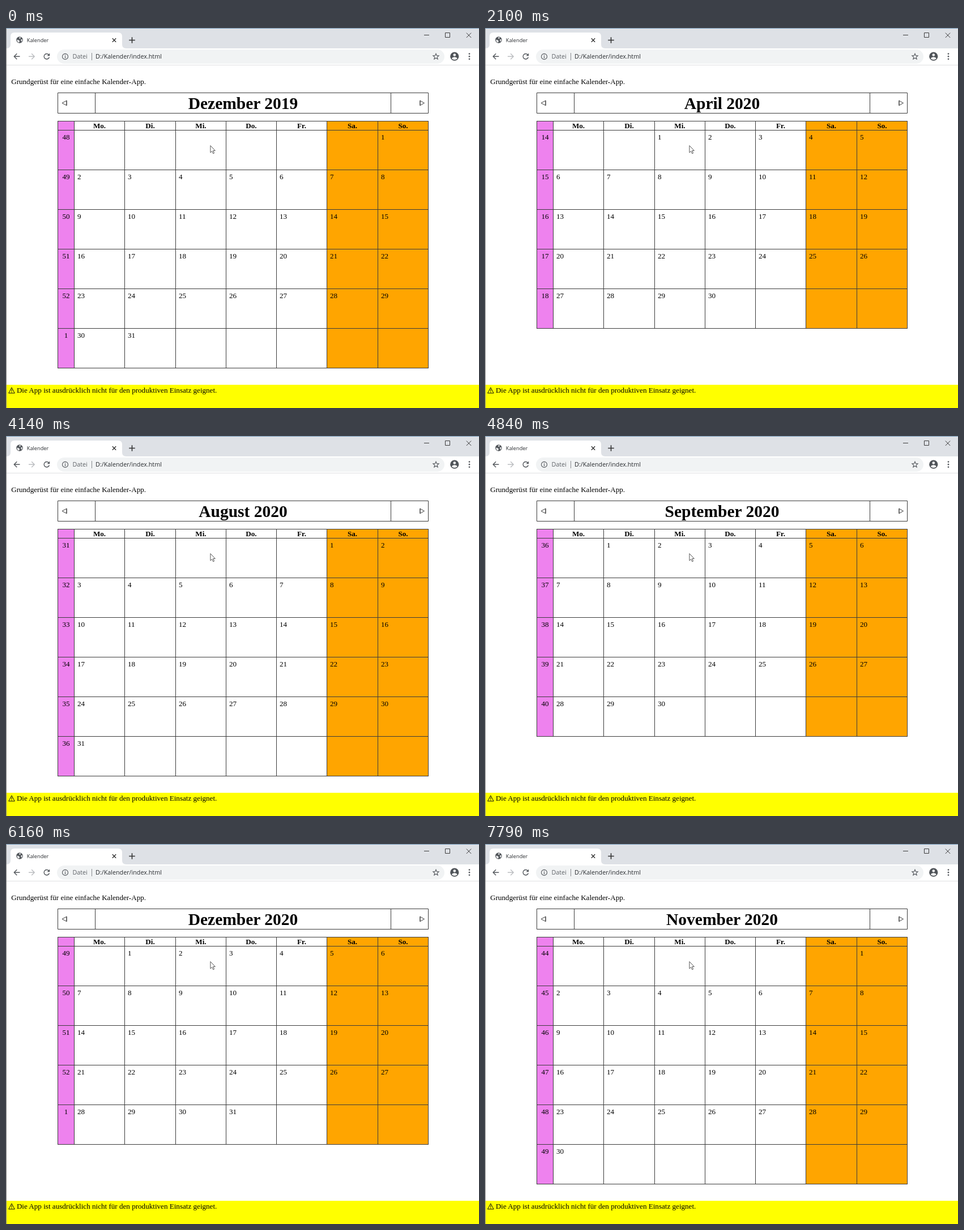
An HTML page that plays this animation: 835x671 px, repeating every 8000 ms.

```html
<!DOCTYPE html>
<html lang="de">
<head>
<meta charset="utf-8">
<title>Kalender</title>
<style>
  html, body { margin: 0; width: 100%; height: 100%; overflow: hidden; background: #fff; }
  svg { display: block; width: 100vw; height: 100vh; }
  text { font: 13.1px "Liberation Serif", serif; fill: #000; }
  .bold { font-weight: bold; text-anchor: middle; }
  .title { font-size: 29.5px; }
  .mid { text-anchor: middle; }
  .ui { font-family: "Open Sans", "Noto Sans", sans-serif; font-size: 10.75px; fill: #2a2d31; }
  .line { fill: none; stroke: #3c3c3c; stroke-width: 1; }
  .icon { fill: none; stroke: #55595e; stroke-width: 1.4; }
</style>
</head>
<body>
<svg viewBox="0 0 835 671" xmlns="http://www.w3.org/2000/svg">
  <rect width="835" height="671" fill="#fff"/>

  <!-- tab strip -->
  <rect width="835" height="36" fill="#dee1e6"/>
  <path d="M1 36Q8 36 8 29V15Q8 8 15 8H198Q205 8 205 15V29Q205 36 212 36Z" fill="#fff"/>
  <circle cx="24" cy="21" r="5.8" fill="#505459"/>
  <path d="M19.5 20.5L23 21.5 24.2 23.5 22.8 25.8Q19.3 24.8 19.5 20.5ZM23.2 16.5L26 16.3 25.5 18.5 23.8 19.5ZM26 20.5L28.7 19.5V22.5L27 24.3Z" fill="#e9eaec"/>
  <text class="ui" x="36.8" y="24.6" style="font-size:9.2px">Kalender</text>
  <path class="icon" d="M187.8 18.3L194.2 24.7M194.2 18.3L187.8 24.7" style="stroke:#333"/>
  <path class="icon" d="M217.2 21.5H227.8M222.5 16.2V26.8" style="stroke:#333;stroke-width:1.6"/>
  <path class="line" d="M738 12.5H747M775.5 8.5H783.5V16.5H775.5ZM812.8 8.6L821.2 17M821.2 8.6L812.8 17"/>

  <!-- toolbar -->
  <path class="icon" d="M24.5 50.2H14.5M19.3 45.2L14.3 50.2 19.3 55.2"/>
  <path class="icon" d="M40 50.2H50M45.2 45.2L50.2 50.2 45.2 55.2" style="stroke:#bcbec1"/>
  <path class="icon" d="M75.3 47A4.7 4.7 0 1 0 76.4 51.5"/>
  <path d="M77.2 44.6V49.3H72.5Z" fill="#55595e"/>
  <rect x="90" y="38" width="684" height="25" rx="12.5" fill="#f1f3f4"/>
  <circle class="icon" cx="104.5" cy="50.4" r="5" style="stroke-width:1.1"/>
  <path class="icon" d="M104.5 49.6V53.2M104.5 47.3V48.5" style="stroke-width:1.2"/>
  <text class="ui" x="117.4" y="54.4" style="fill:#5f6368">Datei</text>
  <path class="line" d="M151.5 44V57" style="stroke:#888b8f"/>
  <text class="ui" x="158" y="54.4">D:/Kalender/index.html</text>
  <path class="icon" id="star" style="stroke-width:1.1"/>
  <circle cx="791.8" cy="50.2" r="7.6" fill="#505459"/>
  <circle cx="791.8" cy="47.5" r="2.3" fill="#fff"/>
  <path d="M787 54Q788 51.3 791.8 51.3T796.6 54Q794.8 56 791.8 56T787 54Z" fill="#fff"/>
  <g fill="#55595e">
    <circle cx="818" cy="45.6" r="1.35"/><circle cx="818" cy="50.2" r="1.35"/><circle cx="818" cy="54.8" r="1.35"/>
  </g>
  <path class="line" d="M0 65.5H835" style="stroke:#dfe0e2"/>

  <!-- page -->
  <text x="9.2" y="98.6">Grundgerüst für eine einfache Kalender-App.</text>
  <path class="line" d="M91.5 114.5H745.5V150.5H91.5ZM157.5 114.5V150.5M679.5 114.5V150.5"/>
  <path class="line" d="M107 128.3L99 132.5 107 136.7ZM107 127.8V137.2M731 128.3L738.5 132.5 731 136.7ZM731 127.8V137.2"/>
  <text class="bold title" id="title" x="418.5" y="143"></text>
  <g id="table"></g>

  <rect y="630" width="835" height="41" fill="#ff0"/>
  <path class="line" d="M10 634.9L15.3 644.8H4.7ZM10 637.8V641.7M10 642.5V643.8" style="stroke:#111"/>
  <text x="18.9" y="644.4">Die App ist ausdrücklich nicht für den produktiven Einsatz geignet.</text>

  <path class="line" d="M0.5 0V671" style="stroke:#858585"/>
  <path class="line" d="M0 0.5H835" style="stroke:#6d93b3"/>
  <path d="M360.9 207.6V220.1L363.7 217.4 365.7 221.8 367.6 220.9 365.6 216.6H369.3Z" fill="#fff" stroke="#555" stroke-width="1"/>
</svg>
<script>
  const LOOP = 8000;
  const MONTHS = ["Januar", "Februar", "März", "April", "Mai", "Juni", "Juli",
    "August", "September", "Oktober", "November", "Dezember"];
  const DAYS = ["Mo.", "Di.", "Mi.", "Do.", "Fr.", "Sa.", "So."];
  const LEFT = 91, DAYS_LEFT = 120, RIGHT = 745, TOP = 164, BODY = 180, ROW = 70;
  const dayX = i => Math.floor(DAYS_LEFT + .5 + i * (RIGHT - DAYS_LEFT) / 7);

  // Each click moves one month forward; the last two go back.
  const CLICKS = [490, 1280, 1730, 2100, 2590, 3050, 3700, 4140, 4840,
    5300, 5760, 6160, 6810, 7410, 7790];
  const FORWARD = 13;

  const byId = id => document.getElementById(id);

  function isoWeek(date) {
    const thursday = new Date(date);
    thursday.setUTCDate(date.getUTCDate() + 3 - (date.getUTCDay() + 6) % 7);
    const yearStart = Date.UTC(thursday.getUTCFullYear(), 0, 1);
    return 1 + Math.floor((thursday - yearStart) / 86400000 / 7);
  }

  const label = (x, y, value, cls = "") => `<text x="${x}" y="${y}" class="${cls}">${value}</text>`;

  function tableMarkup(year, month) {
    const first = new Date(Date.UTC(year, month, 1));
    const count = new Date(Date.UTC(year, month + 1, 0)).getUTCDate();
    const offset = (first.getUTCDay() + 6) % 7;
    const rows = Math.ceil((offset + count) / 7);
    const bottom = BODY + rows * ROW;
    const fill = (from, to, color) =>
      `<rect x="${from}" y="${TOP}" width="${to - from}" height="${bottom - TOP}" fill="${color}"/>`;

    let out = fill(LEFT, DAYS_LEFT, "#ee82ee") + fill(dayX(5), RIGHT, "#ffa500");
    let grid = `M${LEFT} ${TOP + .5}H${RIGHT + 1}M${LEFT + .5} ${TOP}V${bottom + 1}`;
    for (let r = 0; r <= rows; r++) grid += `M${LEFT} ${BODY + r * ROW + .5}H${RIGHT + 1}`;
    for (let c = 0; c <= 7; c++) grid += `M${dayX(c) + .5} ${TOP}V${bottom + 1}`;
    out += `<path class="line" d="${grid}"/>`;

    DAYS.forEach((name, i) => {
      out += label((dayX(i) + dayX(i + 1)) / 2 + .5, 177, name, "bold");
    });
    let week = isoWeek(first);
    for (let r = 0; r < rows; r++) {
      const y = BODY + r * ROW + 17;
      out += label(106, y, week, "mid");
      week = week >= 52 ? 1 : week + 1;
      for (let c = 0; c < 7; c++) {
        const day = r * 7 + c - offset + 1;
        if (day > 0 && day <= count) out += label(dayX(c) + 5.9, y, day);
      }
    }
    return out;
  }

  let shown = null;
  function render(time) {
    const clicks = CLICKS.filter(t => t <= time).length;
    const steps = clicks <= FORWARD ? clicks : 2 * FORWARD - clicks;
    if (steps === shown) return;
    shown = steps;
    const index = 11 + steps;
    const year = 2019 + Math.floor(index / 12), month = index % 12;
    byId("title").textContent = `${MONTHS[month]} ${year}`;
    byId("table").innerHTML = tableMarkup(year, month);
  }

  const starPoints = Array.from({ length: 10 }, (_, i) => {
    const r = i % 2 ? 2.4 : 5.4, a = i * Math.PI / 5;
    return `${(759 + r * Math.sin(a)).toFixed(2)} ${(50.6 - r * Math.cos(a)).toFixed(2)}`;
  });
  byId("star").setAttribute("d", `M${starPoints.join("L")}Z`);

  const start = performance.now();
  function tick() {
    render((performance.now() - start) % LOOP);
    requestAnimationFrame(tick);
  }
  tick();
</script>
</body>
</html>
```
